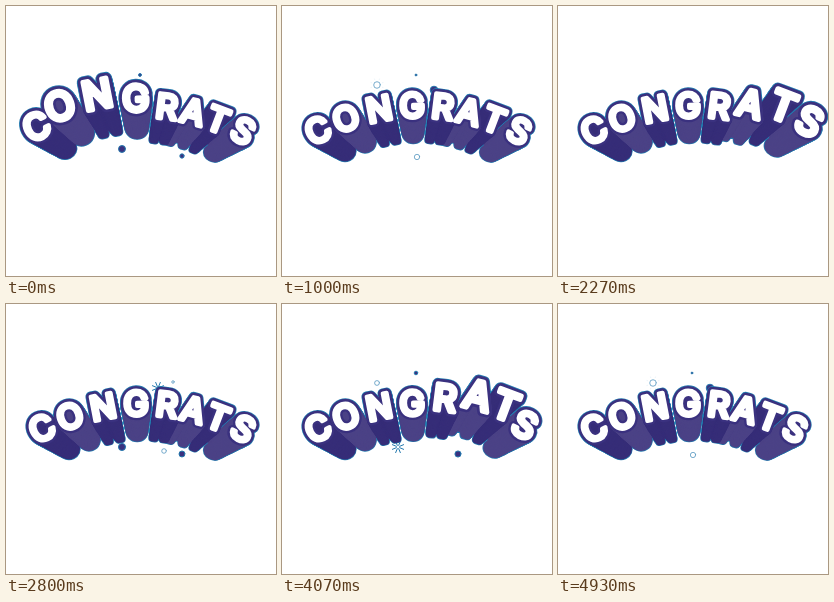
These frames come from a looping animation (270 by 270 pixels, 4990 ms). An HTML page with a canvas:

```html
<!DOCTYPE html>
<html lang="en">
<head>
<meta charset="utf-8">
<title>Congrats</title>
<style>
  html, body { margin: 0; width: 100%; height: 100%; overflow: hidden; background: #fff; }
  canvas { display: block; width: 270px; height: 270px; }
</style>
</head>
<body>
<canvas role="img" aria-label="CONGRATS"></canvas>
<script>
const SIZE = 270, LOOP = 4990, FRAMES = 75;
const WAVE = 1867, STAGGER = 85, SPREAD = 2.6, LEAD = 136, ZOOM = 0.17;
const VANISH = { x: 133, y: 195 }, DEPTH = 0.27, SLICES = 24;
const DARK = '#362d78', LIGHT = '#4b4286', EDGE = '#3a317f', TEAL = '#2479ae';
const FACE_WIDTH = 4.2, EDGE_WIDTH = 8.8, FRINGE_WIDTH = 10.6;
const SPARKLE_LOOP = 3930, SPARKLE_LIFE = 1050, SPARKLE_GAP = 100;

// The word sits on a parabola, each letter tilted along its slope.
const centers = [36, 64, 97, 130, 161, 187, 212, 237];
const letters = [...'CONGRATS'].map((glyph, i) => {
  const fromTop = centers[i] - 136;
  return {
    glyph,
    x: centers[i],
    y: 99.5 + 0.0025 * fromTop ** 2,
    tilt: Math.atan(0.005 * fromTop),
    side: i % 2 ? LIGHT : DARK
  };
});

const dots = { crown: [152, 84], left: [116, 143], right: [176, 150], top: [134, 69] };
const rings = { corner: [95, 79], base: [135, 151], low: [158, 147], high: [167, 78] };
const volleys = [
  [600, 'crown corner base top'],
  [2350, 'crown left right low high'],
  [3600, 'left top right corner']
];

const canvas = document.querySelector('canvas');
const ctx = canvas.getContext('2d');
const ratio = window.devicePixelRatio || 1;
canvas.width = canvas.height = SIZE * ratio;

const mix = (a, b, k) => a + (b - a) * k;
const wrap = (v, n) => ((v % n) + n) % n;

function swell(t, index) {
  const half = WAVE / 2;
  const offset = wrap(t + LEAD - index * STAGGER + half, WAVE) - half;
  const d = Math.abs(offset) / STAGGER / SPREAD;
  return d < 1 ? Math.cos(d * Math.PI / 2) ** 2 : 0;
}

// Zoom 1 is the resting face; smaller values recede to the vanishing point.
function drawGlyph({ glyph, x, y, tilt }, zoom, color, width) {
  ctx.save();
  ctx.translate(mix(VANISH.x, x, zoom), mix(VANISH.y, y, zoom));
  ctx.rotate(tilt);
  ctx.scale(zoom, zoom);
  ctx.strokeStyle = ctx.fillStyle = color;
  ctx.lineWidth = width;
  ctx.strokeText(glyph, 0, 12);
  ctx.fillText(glyph, 0, 12);
  ctx.restore();
}

function extrude({ letter, zoom }, color, width) {
  for (let i = 0; i <= SLICES; i++) {
    drawGlyph(letter, zoom * mix(1 - DEPTH, 1, i / SLICES), color, width);
  }
}

function rays(x, y, inner, outer) {
  ctx.beginPath();
  for (let i = 0; i < 8; i++) {
    const a = i * Math.PI / 4 + Math.PI / 8;
    ctx.moveTo(x + Math.cos(a) * inner, y + Math.sin(a) * inner);
    ctx.lineTo(x + Math.cos(a) * outer, y + Math.sin(a) * outer);
  }
  ctx.stroke();
}

// Swells as a dot or ring, bursts into rays, then fades as specks.
function sparkle(k, name) {
  const filled = name in dots;
  const [x, y] = filled ? dots[name] : rings[name];
  const radius = name === 'top' ? 2 : 4;
  ctx.strokeStyle = TEAL;
  ctx.fillStyle = EDGE;
  ctx.lineWidth = 1;
  ctx.globalAlpha = filled ? 1 : 0.6;
  if (k < 0.42) {
    ctx.beginPath();
    ctx.arc(x, y, radius * Math.sqrt(k / 0.42), 0, 2 * Math.PI);
    if (filled) ctx.fill();
    ctx.stroke();
  } else if (k < 0.72) {
    const p = (k - 0.42) / 0.3;
    rays(x, y, radius * mix(0.4, 1.2, p), radius * mix(1.5, 1.8, p));
  } else {
    ctx.globalAlpha = 0.8 * (1.1 - k);
    rays(x, y, radius * 1.5, radius * 1.5 + 0.5);
  }
  ctx.globalAlpha = 1;
}

function draw(t) {
  ctx.setTransform(ratio, 0, 0, ratio, 0, 0);
  ctx.fillStyle = '#fff';
  ctx.fillRect(0, 0, SIZE, SIZE);
  ctx.font = '500 34px Inter, "Open Sans", sans-serif';
  ctx.textAlign = 'center';
  ctx.lineJoin = ctx.lineCap = 'round';

  for (const [start, names] of volleys) {
    names.split(' ').forEach((name, i) => {
      const k = wrap(t - start - i * SPARKLE_GAP, SPARKLE_LOOP) / SPARKLE_LIFE;
      if (k < 1) sparkle(k, name);
    });
  }

  const poses = letters.map((letter, i) => ({ letter, zoom: 1 + ZOOM * swell(t, i) }));
  const inward = [...poses].sort((a, b) =>
    Math.abs(b.letter.x - VANISH.x) - Math.abs(a.letter.x - VANISH.x));

  poses.forEach(p => extrude(p, TEAL, FRINGE_WIDTH));
  inward.forEach(p => extrude(p, p.letter.side, EDGE_WIDTH));
  poses.forEach(p => drawGlyph(p.letter, p.zoom, EDGE, EDGE_WIDTH));
  poses.forEach(p => drawGlyph(p.letter, p.zoom, '#fff', FACE_WIDTH));
}

const origin = performance.now();
let shown = -1;
function tick() {
  const t = (performance.now() - origin) % LOOP;
  const frame = Math.floor((t + 1) / LOOP * FRAMES) % FRAMES;
  if (frame !== shown) {
    shown = frame;
    draw(frame * LOOP / FRAMES);
  }
  requestAnimationFrame(tick);
}
tick();
</script>
</body>
</html>
```
